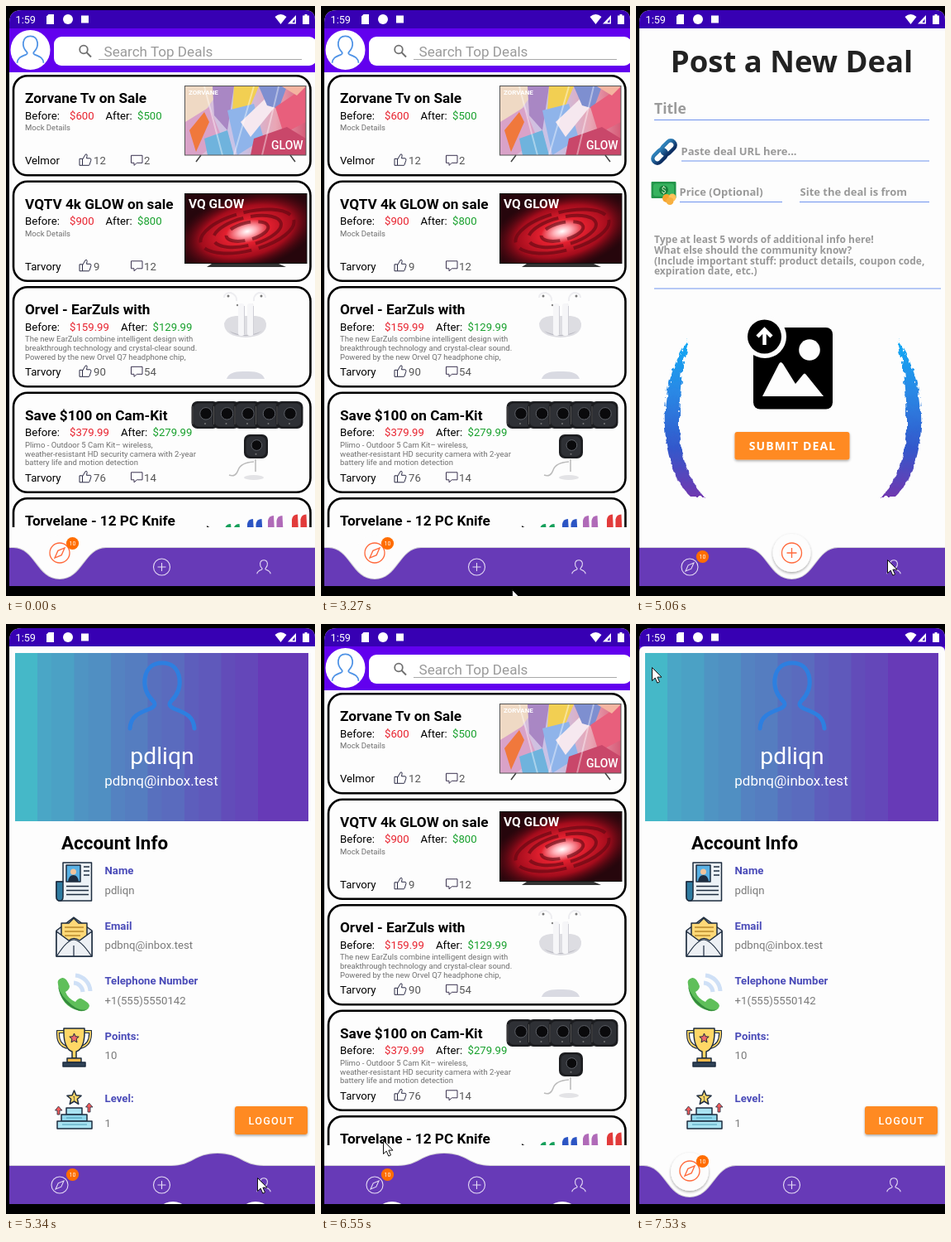
These frames come from a looping animation (374 by 712 pixels, 8000 ms). An HTML page:

```html
<!DOCTYPE html>
<html lang="en">
<head>
<meta charset="utf-8">
<title>Deals app</title>
<style>
  html, body { margin: 0; width: 100%; height: 100%; overflow: hidden; background: #000; }
  svg { display: block; width: 374px; height: 712px; }
  text { font-family: Roboto, sans-serif; white-space: pre; }
  .round text { font-family: "Open Sans", sans-serif; font-weight: 700; }
  .thin { vector-effect: non-scaling-stroke; }
</style>
</head>
<body>
<svg id="stage" viewBox="0 0 374 712" xmlns="http://www.w3.org/2000/svg">
  <defs>
    <clipPath id="screen"><path d="M4 20Q4 5 19 5H362Q374 5 374 17V700H4Z"/></clipPath>
    <clipPath id="list"><path d="M4 80H374V629H4Z"/></clipPath>
    <clipPath id="tv1"><path d="M217 97H363V180H217Z"/></clipPath>
    <clipPath id="tv2"><path d="M217 227H364V310H217Z"/></clipPath>
    <linearGradient id="paint">
      <stop offset="0" stop-color="#e8b9cf"/><stop offset=".45" stop-color="#c3c4ea"/>
      <stop offset=".75" stop-color="#e9a5b4"/><stop offset="1" stop-color="#d65b77"/>
    </linearGradient>
    <radialGradient id="galaxy">
      <stop offset="0" stop-color="#fff"/><stop offset=".12" stop-color="#ffb0b8"/>
      <stop offset=".3" stop-color="#e3202f"/><stop offset=".65" stop-color="#a30c1c"/>
      <stop offset="1" stop-color="#4a0610" stop-opacity="0"/>
    </radialGradient>
    <linearGradient id="brush" x2="0" y2="1">
      <stop offset="0" stop-color="#12aaf5"/><stop offset=".35" stop-color="#2b86e4"/>
      <stop offset=".68" stop-color="#3159cc"/><stop offset="1" stop-color="#7038b0"/>
    </linearGradient>
    <linearGradient id="steel" x2="0" y2="1">
      <stop offset="0" stop-color="#2d7fb8"/><stop offset="1" stop-color="#0d2f63"/>
    </linearGradient>
    <filter id="rough" x="-30%" width="160%">
      <feTurbulence type="fractalNoise" baseFrequency=".25 .12" numOctaves="2" seed="4"/>
      <feDisplacementMap in="SourceGraphic" scale="7"/>
    </filter>
    <filter id="shade" x="-40%" y="-40%" width="180%" height="180%">
      <feDropShadow dx="0" dy="1.5" stdDeviation="1.6" flood-opacity=".35"/>
    </filter>
    <path id="person" class="thin" fill="none" d="M-39 80C-38 66-30 62-14 56C-8 53-8 50-11 47C-20 38-22 28-21 20C-19 6-10 1 0 1C10 1 19 6 21 20C22 28 20 38 11 47C8 50 8 53 14 56C30 62 38 66 39 80"/>
    <g id="thumb" fill="none" stroke="#2b2b45" stroke-width="1">
      <path d="M0 6H3.500V14H0ZM3.500 7L7 1Q9.500-.5 9 3L8.500 5.500H13Q14.500 6 13.800 8L12 13.500Q11.600 14 11 14H3.500"/>
    </g>
    <path id="note" d="M0 0H13.500V9H7L3.500 12V9H0Z" fill="none" stroke="#3b3350"/>
  </defs>
  <g clip-path="url(#screen)">
    <rect width="374" height="700" fill="#fdfdfd"/>
    <g id="pages"></g>
    <g id="status"></g>
    <g id="bar">
      <path id="edge" fill="none" stroke="#d2d0d6" stroke-width="2"/>
      <path id="base" fill="#673ab7"/>
      <g id="bubbles" fill="#fdfdfd"></g>
      <g id="icons"></g>
    </g>
  </g>
  <path id="cursor" d="M0 0V16L3.700 12.600L6.300 18.600L9 17.400L6.400 11.600H11.500Z" fill="#fff" stroke="#111"/>
</svg>
<script>
const $ = id => document.getElementById(id);
const GRAY = '#8a8a8a', INK = '#1d2c3f', ORANGE = '#ff8a22';

const text = (x, y, size, str, fill = '#000', more = '') =>
  `<text x="${x}" y="${y}" font-size="${size}" fill="${fill}" ${more}>${str}</text>`;
const rect = (x, y, w, h, fill, more = '') =>
  `<rect x="${x}" y="${y}" width="${w}" height="${h}" fill="${fill}" ${more}/>`;
const circle = (x, y, r, fill, more = '') =>
  `<circle cx="${x}" cy="${y}" r="${r}" fill="${fill}" ${more}/>`;
const path = (d, fill = 'none', more = '') => `<path d="${d}" fill="${fill}" ${more}/>`;
const line = (d, color, w = 1) => path(d, 'none', `stroke="${color}" stroke-width="${w}"`);
const use = (id, x, y, s = 1, more = '') =>
  `<use href="#${id}" transform="translate(${x} ${y}) scale(${s})" ${more}/>`;
const BOLD = 'font-weight="700"', MID = 'text-anchor="middle"';

// Home

const deals = [
  ['Zorvane Tv on Sale', '$600', '$500', ['Mock Details'], 'Velmor', 12, 2],
  ['VQTV 4k GLOW on sale', '$900', '$800', ['Mock Details'], 'Tarvory', 9, 12],
  ['Orvel - EarZuls with', '$159.99', '$129.99',
    ['The new EarZuls combine intelligent design with', 'breakthrough technology and crystal-clear sound.',
     'Powered by the new Orvel Q7 headphone chip,'], 'Tarvory', 90, 54],
  ['Save $100 on Cam-Kit', '$379.99', '$279.99',
    ['Plimo - Outdoor 5 Cam Kit– wireless,', 'weather-resistant HD security camera with 2-year',
     'battery life and motion detection'], 'Tarvory', 76, 14],
  ['Torvelane - 12 PC Knife', '$129.99', '$49.99', [], 'Tarvory', 31, 8],
];

function card([title, before, after, desc, store, likes, notes], i) {
  const y = 84.300 + i * 127.500, shift = before.length > 4 ? 18.500 : 0;
  return rect(9, y, 359.500, 120, '#fdfdfd', 'rx="17" stroke="#000" stroke-width="2.600"') +
    text(23, y + 33, 17.200, title, '#000', BOLD) +
    text(23, y + 52.500, 13.200, 'Before:') + text(77, y + 52.500, 13.200, before, '#e8222e') +
    text(120.500 + shift, y + 52.500, 13.200, 'After:') + text(159 + shift, y + 52.500, 13.200, after, '#17a02c') +
    desc.map((d, n) => text(23, y + 66 + n * 10.800, 9.500, d, '#6f6f6f')).join('') +
    text(23, y + 107, 13.200, store) +
    use('thumb', 89, y + 94) + text(106, y + 107, 13.200, likes, '#555') +
    use('note', 151.500, y + 96) + text(167, y + 107, 13.200, notes, '#555');
}

function paintedTv() {
  const shards = [
    ['217 97 262 97 240 128 217 140', '#efd9c4'], ['217 140 246 122 262 160 236 180 217 180', '#d9a2c8'],
    ['222 150 240 128 246 140 230 176', '#f0783c'], ['250 97 276 97 268 150 252 132', '#a987c4'],
    ['276 97 306 97 290 134 274 126', '#f2cf52'], ['268 126 300 118 312 160 280 180', '#8fb4ea'],
    ['284 140 322 104 330 116 296 158', '#f6e8ef'], ['306 97 340 97 330 124 316 120', '#7e8fd0'],
    ['326 122 363 97 363 140 336 154', '#e85f7c'], ['300 160 340 146 363 160 363 180 296 180', '#c9476a'],
    ['240 160 268 150 276 180 244 180', '#6fb3dd'], ['334 97 363 97 352 108', '#f4b4a0'],
  ];
  return `<g clip-path="url(#tv1)">${rect(217, 97, 146, 83, 'url(#paint)')}` +
    shards.map(([p, c]) => `<polygon points="${p}" fill="${c}"/>`).join('') +
    line('M240 97L262 180M300 97L276 180M330 97L310 180', '#fff6', 2) + '</g>' +
    rect(216.500, 96.500, 146.500, 83.500, 'none', 'stroke="#555"') +
    line('M236 180L230 188M344 180L350 188', '#444', 1.500) +
    text(221, 107, 8, 'ZORVANE', '#fff', BOLD) + text(321, 173, 14, 'GLOW', '#fff', 'font-weight="500"');
}

const galaxyTv = () =>
  rect(217, 227, 147, 84, '#26060c') +
  `<g clip-path="url(#tv2)"><g transform="rotate(-14 292 272)">` +
  '<ellipse cx="292" cy="272" rx="88" ry="46" fill="url(#galaxy)"/>' +
  [26, 42, 58].map(r => `<ellipse cx="292" cy="272" rx="${r}" ry="${r * .4}" fill="none" stroke="#5d0712" stroke-opacity=".6" stroke-width="4" stroke-dasharray="${r} 9"/>`).join('') +
  `</g></g>` + rect(216.500, 226.500, 147.500, 84, 'none', 'stroke="#111"') +
  path('M249 311H330L339 315H243Z', '#333') + text(221, 244, 15.500, 'VQ GLOW', '#fff', BOLD);

const buds = () =>
  path('M264 352Q264 346 272 346Q280 349 279 356M314 352Q314 346 306 346Q299 349 300 356', 'none', 'stroke="#ededf0" stroke-width="2"') +
  circle(269, 350, 1.500, '#777') + circle(309, 350, 1.500, '#777') +
  circle(280, 361, 1.200, '#888') + circle(298, 361, 1.200, '#888') +
  path('M264 383Q266 375 278 374H302Q314 375 315 383Q316 399 290 400Q264 399 264 383Z', '#dddde2') +
  path('M270 392Q290 402 310 392Q302 398 290 398Q277 398 270 392Z', '#b9b9c2') +
  rect(281, 359, 7.500, 39, '#f6f6f8', 'rx="3"') + rect(292, 359, 7.500, 39, '#f6f6f8', 'rx="3"') +
  line('M288.500 362V396M299.500 362V396', '#cfcfd6') +
  path('M267 450Q270 440 290 441Q310 440 313 450Z', '#d9dae2');

const camera = (x, y, s) =>
  rect(x, y, s, s, '#1c1d20', 'rx="7"') +
  rect(x + 2.500, y + 2.500, s - 5, s - 5, '#2e3035', 'rx="6"') +
  circle(x + s * .53, y + s * .45, s * .22, '#0a0a0c', 'stroke="#5c5f66"') +
  circle(x + s * .5, y + s * .82, 1, '#777');

function cameras() {
  let s = '';
  for (let i = 0; i < 5; i++) s += camera(224.500 + i * 25.500, 477, 33) + line(`M${226 + i * 25.500} 483V505`, '#555');
  return s + line('M302 547V562M300 550Q284 551 281 560T270 566', '#bbb', 1.500) +
    '<ellipse cx="300" cy="569" rx="12" ry="3" fill="#e3e3e6"/>' + camera(288, 517, 29);
}

function knives() {
  const sets = [['#17a05b', 265, 625], ['#2c55c4', 292, 619], ['#b06ab8', 317, 615], ['#e23b3b', 346, 613.500]];
  return sets.map(([c, x, y]) => [0, 10.500].map(d =>
    path(`M${x + d} 634V${y + 6}Q${x + d + 1} ${y} ${x + d + 7} ${y}L${x + d + 8} 634Z`, c)).join('')).join('') +
    path('M243 630V627L248 630Z', '#222');
}

const home = () =>
  rect(4, 26, 370, 54, '#6200ee') + circle(29.500, 53, 24, '#fff') +
  use('person', 29.500, 36, .41, 'stroke="#4f93e6" stroke-width="1.800"') +
  rect(58, 37, 318, 35, '#fff', 'rx="9"') +
  circle(94, 52.500, 4.800, 'none', 'stroke="#707070" stroke-width="1.800"') + line('M97.500 56L103 61.500', '#707070', 2) +
  line('M112 64.500H358', '#a9a9a9') + text(118.500, 60.500, 17.100, 'Search Top Deals', '#9a9a9a') +
  `<g clip-path="url(#list)">${deals.map(card).join('')}${paintedTv()}${galaxyTv()}${buds()}${cameras()}${knives()}</g>`;

// Post form

function form(round) {
  const k = round ? 1 : 0, pick = (a, b) => k ? b : a;
  const hint = ['Type at least 5 words of additional info here!', 'What else should the community know?',
    '(Include important stuff: product details, coupon code,', 'expiration date, etc.)'];
  const size = pick(13.200, 13), w = pick(124, 139);
  return `<g class="${pick('', 'round')}">` +
    text(188.500, 80, pick(34, 36.500), 'Post a New Deal', '#222', MID) +
    text(22, 130, pick(17, 17.500), 'Title', '#9b9b9b') +
    text(54.500, 180, size, 'Paste deal URL here...', '#999') +
    text(52.500, 229, size, 'Price (Optional)', '#999') + text(198.500, 229, size, 'Site the deal is from', '#999') +
    hint.map((h, i) => text(22, 286 + i * pick(13.300, 12.800), pick(11.300, 12), h, '#999')).join('') +
    rect(189 - w / 2, 514, w, 33.500, ORANGE, 'rx="3" filter="url(#shade)"') +
    text(189.500, 535.500, pick(13, 14), 'SUBMIT DEAL', '#fff', MID + ' font-weight="500" letter-spacing="1.150"') + '</g>' +
    line('M22 137.500H355M55 187H355M53 236.500H177M198 236.500H355M22 341H369', '#6f93ee', 1.200) +
    `<g transform="translate(34 176) rotate(-45)" fill="none" stroke="url(#steel)" stroke-width="4.500">
      <rect x="-17" y="-5.500" width="19" height="11" rx="5.500"/><rect x="-2" y="-5.500" width="19" height="11" rx="5.500"/></g>` +
    rect(18.500, 212, 30, 20, '#23954a', 'rx="1"') + rect(21, 214.500, 25, 15, '#37b35f', 'rx="3"') +
    circle(33.500, 222, 5.500, '#17803b') + text(33.500, 226, 10, '$', '#d9f2c9', MID) +
    circle(37, 232, 5, '#f5a32e') + circle(44, 231, 4.500, '#ffc25a') + circle(41, 235.500, 4.500, '#f7b03f') +
    rect(142, 388, 96, 98.500, '#000', 'rx="8"') + circle(210, 415, 12.800, '#fdfdfd') +
    path('M153 471L173 432Q175 428 178 432L193 456L202 445Q204 442 206 445L227 471Z', '#fdfdfd') +
    circle(156, 399, 26, '#fdfdfd') + circle(155.500, 399, 20.500, '#000') +
    path('M155.500 409V391M147 399L155.500 390.500L164 399', 'none', 'stroke="#fff" stroke-width="4.500"') +
    brush('') + brush('translate(380 0) scale(-1 1)');
}

const brush = move => `<g transform="${move}"><g filter="url(#rough)">` +
  path('M64 403C42 432 33 472 35 510C37 545 48 575 66 592L82 592C62 570 51 535 52 500C53 462 56 430 64 403Z', 'url(#brush)') +
  line('M53 424C46 450 44 480 44 500M57 570Q66 584 74 591', '#fdfdfd9', 1) + '</g></g>';

// Account

function stripes() {
  const mix = (a, b, k) => Math.round(a + (b - a) * k);
  let s = '', n = 16;
  for (let i = 0; i < n; i++) {
    const j = i >> 1, x = i < 1 ? 11 : Math.min(366, 38 + (j - 1) * 44.500 + (i % 2 ? 17 : 0));
    const k = Math.min(1, (j + (i % 2 ? .3 : 0)) / 7);
    if (i !== 1) s += rect(x, 35, 366 - x, 203, `rgb(${mix(69, 103, k)},${mix(184, 58, k)},${mix(200, 183, k)})`);
  }
  return s;
}

const outlined = (d, fill) => path(d, fill, `stroke="${INK}" stroke-width="1.500" stroke-linejoin="round"`);
const star = (x, y, r) => 'M' + Array.from({ length: 10 }, (_, i) => {
  const a = i * Math.PI / 5, q = i % 2 ? r * .45 : r;
  return `${(x + q * Math.sin(a)).toFixed(1)} ${(y - q * Math.cos(a)).toFixed(1)}`;
}).join('L') + 'Z';

const infoIcons = () =>
  outlined('M69 288H103.500V334H66Q61 334 61 329V311H69Z', '#edf2f6') + outlined('M61 311H69V329Q69 334 65 334Q61 334 61 329Z', '#2e7ba0') +
  outlined('M73 291H90V311H73Z', '#58b0e4') + path('M75 311Q76 303 81.500 303T88 311Z', INK) + circle(81.500, 299, 3.500, '#f2c49b') +
  line('M94 293H101M94 298H101M94 303H101M73 316.500H100M73 321.500H100M73 326.500H100', INK, 1.300) +
  outlined('M61 370L82 354L104 370V401H61Z', '#d5dbe3') + outlined('M67 386V361H76L82 355L88 361H98V386Z', '#ffd978') +
  line('M71 366H94M71 371H94M71 376H90', '#b98a2c', 1.300) +
  outlined('M61 371L76 382Q82 377 89 382L104 371V401H61Z', '#edf0f4') + line('M62 400Q74 381 82 381T103 400M82 388V401', INK, 1.200) +
  line('M84 424A20 20 0 0 1 102 443M82 433A12 12 0 0 1 93 444', '#cfe0f6', 5) +
  path('M63 435Q61 429 68 427Q73 426 77 437Q77 441 72 444Q75 452 84 456Q88 451 91 452Q101 457 101 461Q99 468 89 467Q66 462 63 435Z', '#5fbf5a') +
  path('M63 437Q66 457 84 465Q92 469 98 465Q90 468 80 460Q66 449 63 437Z', '#348a3d') +
  line('M71 492H63Q62 508 74 511M93 492H102Q103 508 90 511', INK, 4) + line('M71 492H63Q62 508 74 511M93 492H102Q103 508 90 511', '#ffd766', 1.800) +
  outlined('M70 488H95Q96 512 85 516V524H80V516Q69 512 70 488Z', '#ffd766') + path(star(82.500, 500, 6), '#ef6a6a', `stroke="${INK}"`) +
  outlined('M74 524H91V529H74Z', '#f3b94a') + outlined('M69 529H96V534H69Z', '#2f4256') +
  outlined('M73 584H92V592H73Z', '#a9e3f2') + outlined('M67 592H98V600H67Z', '#8fd6ea') + outlined('M62 600H104V609H62Z', '#a9e3f2') +
  line('M68 604H98M73 596H92', '#4b9db5', 1.200) + outlined(star(82.500, 572, 9), '#ffd766') + text(82.500, 575, 7, '1', INK, MID) +
  path('M63.500 582L68 587H65V592H62V587H59.500ZM100.500 578L105 583H102V589H99V583H96.500Z', '#ef5b5b', `stroke="${INK}" stroke-width=".8"`);

function account() {
  const rows = [['Name', 'pdliqn', 302, 325.500], ['Email', 'pdbnq@inbox.test', 368.500, 391.500],
    ['Telephone Number', '+1(555)5550142', 435, 458.500], ['Points:', '10', 501.500, 524.500], ['Level:', '1', 577, 606.500]];
  return rect(4, 27, 370, 627, '#fdfdfd', 'rx="6"') + stripes() +
    use('person', 189, 46, 1, 'stroke="#2d7fe0" stroke-width="5" stroke-linecap="round"') +
    text(189, 168.500, 28.300, 'pdliqn', '#fff', MID) + text(188, 195, 17, 'pdbnq@inbox.test', '#fff', MID) +
    text(67, 272, 22.400, 'Account Info', '#000', BOLD) + infoIcons() +
    rows.map(([a, b, y, v]) => text(119.500, y, 13.200, a, '#4a4bb8', BOLD) + text(119.500, v, 13.200, b, '#7a7a7a')).join('') +
    rect(277, 582, 88, 34, ORANGE, 'rx="3" filter="url(#shade)"') +
    text(321.500, 604, 12.700, 'LOGOUT', '#fff', MID + ' font-weight="500" letter-spacing="1.200"');
}

$('pages').innerHTML = rect(4, 26, 370, 20, '#5a10d8') + rect(4, 27, 370, 627, '#fdfdfd', 'id="plain"') +
  [home(), form(false), form(true), account()].map((p, i) => `<g id="page${i}">${p}</g>`).join('');

$('status').innerHTML = rect(4, 5, 370, 22, '#3700b3') + text(11.500, 20.500, 12.700, '1:59', '#fff') +
  path('M51.500 10H58V22H49V12.500Z', '#fff') + circle(75, 16, 6, '#fff') + rect(91, 11.500, 9, 9, '#fff') +
  path('M325.500 13Q332.500 7 339.500 13L332.500 22Z', '#fff') + path('M341 21.500H351V11ZM346.500 20H349.500V15.500Z', '#fff', 'fill-rule="evenodd"') +
  path('M359 11.500H361.500V10H364.500V11.500H367V22H359Z', '#fff');

// Bottom bar

const TABS = [65, 188.500, 312];
const glyphs = [
  circle(0, 0, 10, 'none') + path('M5-5L1.800 2.200L-5 5L-1.800-2.200Z'),
  circle(0, 0, 10, 'none') + path('M-5 0H5M0-5V5'),
  use('person', 0, -8.500, .21),
];
$('icons').innerHTML = glyphs.map((g, i) => `<g id="tab${i}" fill="none" stroke-width="1.100">${g}</g>`).join('') +
  `<g id="badge">${circle(0, 0, 7.600, '#ff6d00')}${text(0, 2.600, 7, '10', '#fff', MID)}</g>`;
$('bubbles').innerHTML = circle(0, 0, 23, '#fdfdfd') .repeat(2);

// time, notch centre, notch depth, bubbles [x, y], raised tab, hidden tab
const bars = [
  [0, 65, 38, [[65, 661]], 0],
  [4090, 182, 38, [[182, 683]], -1, 1],
  [4220, 188.500, 38, [[188.500, 660]], 1],
  [5340, 256, -15, [[202, 720], [302, 720]], -1],
  [5460, 308, 38, [[308, 683]], -1, 2],
  [5580, 312, 37, [[312, 660]], 2],
  [6550, 149, -15, [[86, 720], [292, 720]], -1],
  [6700, 69, 38, [[69, 683]], -1, 0],
  [6820, 65, 38, [[65, 661]], 0],
];
const pages = [[0, 0], [4090, 1], [4220, 2], [5340, 3], [6550, 0], [7530, 3]];
const moves = [
  [0, -50, 0], [120, 373, 599], [270, 345, 640], [390, 303, 694], [510, -50, 0],
  [3270, 231, 704], [3410, 201, 695], [3560, 194, 692], [3680, 193, 691], [3830, 193, 690],
  [4370, 201, 690], [4510, 238, 686], [4640, 272, 678], [4760, 301, 669], [4910, 304, 668],
  [5460, 262, 560], [5580, 202, 492], [5730, 201, 561], [5880, 145, 645], [6000, 93, 684], [6150, 77, 687],
  [6550, 75, 623], [6700, 56, 500], [6820, 30, 230], [6940, 13, 42], [7230, 18, 52], [7380, 19, 52],
];
const at = (keys, t) => keys.findLast(k => k[0] <= t);

function drawBar([start, c, d, spots, raised, hidden]) {
  const y = 654, b = y + d;
  const top = `M4 ${y}H${c - 56}C${c - 30} ${y} ${c - 28} ${b} ${c} ${b}S${c + 30} ${y} ${c + 56} ${y}H374`;
  $('edge').setAttribute('d', top);
  $('base').setAttribute('d', top + 'V700H4Z');
  $('bubbles').setAttribute('filter', start ? 'url(#shade)' : 'none');
  [...$('bubbles').children].forEach((el, i) => {
    const [x, cy] = spots[i] || [0, 900];
    el.setAttribute('cx', x);
    el.setAttribute('cy', cy);
  });
  TABS.forEach((x, i) => {
    const up = raised === i, tab = $('tab' + i);
    tab.setAttribute('transform', `translate(${x} ${up ? 660 : 677}) scale(${up ? 1.200 : 1})`);
    tab.setAttribute('stroke', up ? '#ff6a3c' : '#e6dcf5');
    tab.style.display = hidden === i ? 'none' : '';
  });
  $('badge').setAttribute('transform', `translate(80.500 ${raised ? 664.500 : 648.500})`);
}

function render(t) {
  const page = at(pages, t)[1];
  for (let i = 0; i < 4; i++) $('page' + i).style.display = i === page ? '' : 'none';
  $('plain').style.display = t >= 7530 ? 'none' : '';
  drawBar(at(bars, t));
  const [, x, y] = at(moves, t);
  $('cursor').setAttribute('transform', `translate(${x + .5} ${y + .5})`);
}

const began = performance.now();
function tick() {
  render((performance.now() - began) % 8000);
  requestAnimationFrame(tick);
}
tick();
</script>
</body>
</html>
```
